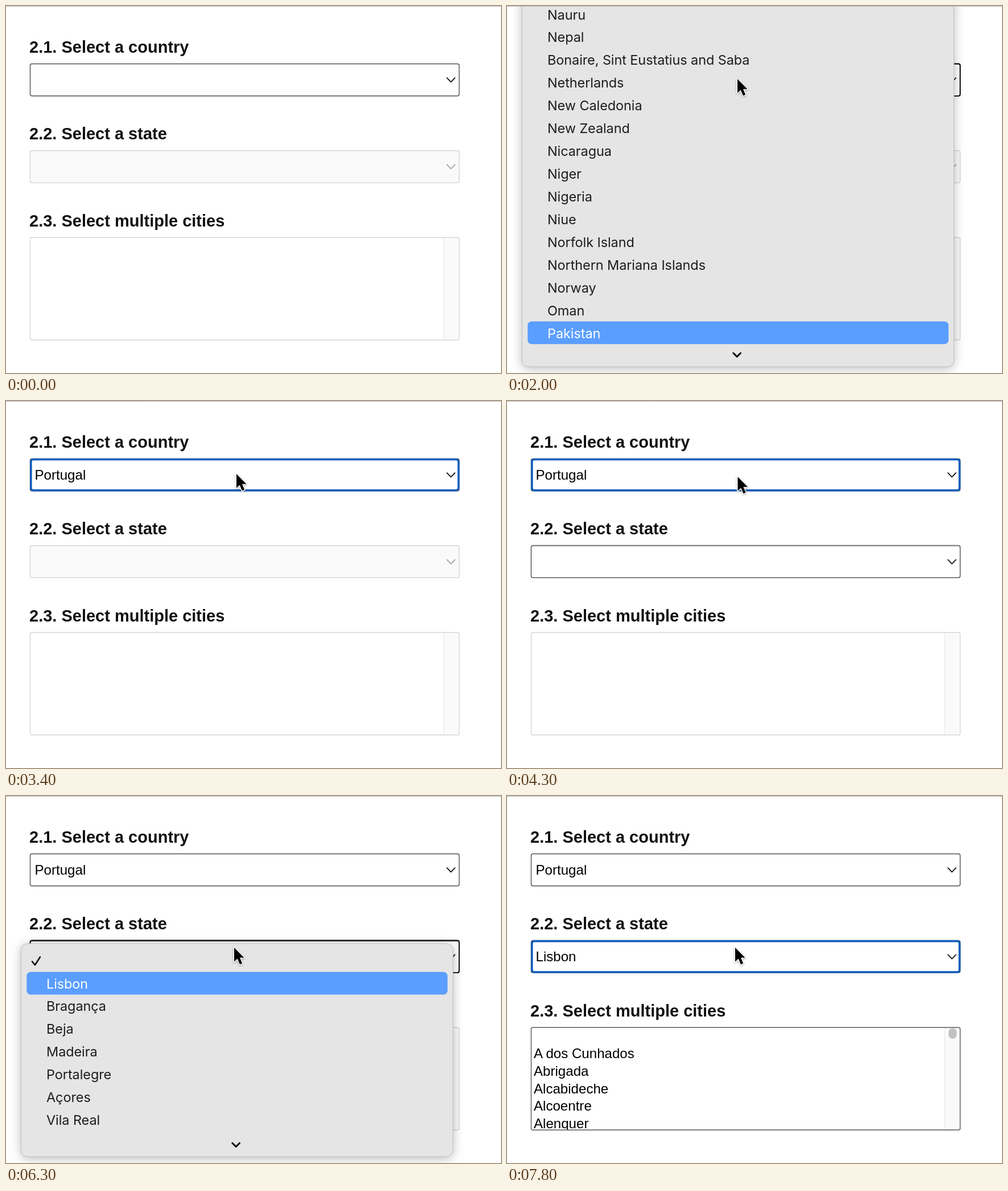
Recreate the animation shown at these times as an HTML page. Size 870 px wide and 644 px high, loop 8000 ms.

```html
<!DOCTYPE html>
<html lang="en">
<head>
<meta charset="utf-8">
<title>Dependent selects</title>
<style>
html, body { margin: 0; width: 100%; height: 100%; overflow: hidden; background: #fff; }
svg { display: block; width: 870px; height: 644px; }
text { font: 24.1px "Liberation Sans", Arial, sans-serif; fill: #000; }
.head text { font-size: 29px; font-weight: bold; fill: #111; }
.menu text { font: 23.5px Inter, Roboto, sans-serif; letter-spacing: -.1px; fill: #1d1d1d; }
.menu .pick text { fill: #fff; }
.pick rect { fill: #5a9eff; }
.panel { fill: #e5e5e5; stroke: #bcbcbc; filter: drop-shadow(0 3px 9px rgba(0,0,0,.26)); }
.box { fill: #fff; stroke: #505050; stroke-width: 1.4; }
.off { fill: #fafafa; stroke: #d4d4d4; }
.pressed { fill: none; stroke: #000; stroke-width: 1.8; }
.ring { fill: none; stroke: #0f5dbd; stroke-width: 3.6; }
.line { fill: none; stroke: #111; stroke-linecap: round; stroke-linejoin: round; }
.dim { stroke: #a6a6a6; }

/* one loop is 8 s, so 1.25% is 100 ms */
.run { animation: 8s step-end -8ms infinite; }
#countryPressed { animation-name: country-pressed; }
#countryRing { animation-name: country-ring; }
#countryValue { animation-name: country-value; }
#stateOn { animation-name: state-on; }
#statePressed { animation-name: state-pressed; }
#stateDone { animation-name: state-done; }
#citiesOn { animation-name: cities-on; }
#menuFirst { animation-name: menu-first; }
#menuCountry { animation-name: menu-country; }
#countryList { animation-name: country-list; }
#countryPick { animation-name: country-pick; }
#pickA { animation-name: pick-a; }
#pickB { animation-name: pick-b; }
#pickC { animation-name: pick-c; }
#menuState { animation-name: menu-state; }
#statePick { animation-name: state-pick; }
#cursor { animation-name: move; }

@keyframes country-pressed { 0%, 42.5% { opacity: 0 } 11.25% { opacity: 1 } }
@keyframes country-ring { 0%, 65% { opacity: 0 } 42.5% { opacity: 1 } }
@keyframes country-value { 0% { opacity: 0 } 42.5%, 100% { opacity: 1 } }
@keyframes state-on { 0% { opacity: 0 } 46.25%, 100% { opacity: 1 } }
@keyframes state-pressed { 0%, 92.5% { opacity: 0 } 62.5% { opacity: 1 } }
@keyframes state-done { 0% { opacity: 0 } 92.5%, 100% { opacity: 1 } }
@keyframes cities-on { 0% { opacity: 0 } 97.5%, 100% { opacity: 1 } }
@keyframes menu-first { 0%, 25% { opacity: 0 } 12.5% { opacity: 1 } }
@keyframes menu-country {
  0%, 42.5% { opacity: 0 } 25% { opacity: 1 }
  38.75% { opacity: .94 } 40% { opacity: .65 } 41.25% { opacity: .25 }
}
@keyframes country-list {
  0% { transform: none }
  26.25% { transform: translateY(-359.37px) }
  27.5%, 100% { transform: translateY(-399.3px) }
}
@keyframes country-pick { 0%, 38.75%, 100% { opacity: 1 } 33.75% { opacity: 0 } }
@keyframes pick-a { 0% { opacity: 1 } 26.25%, 100% { opacity: 0 } }
@keyframes pick-b { 0%, 27.5% { opacity: 0 } 26.25% { opacity: 1 } }
@keyframes pick-c { 0% { opacity: 0 } 27.5%, 100% { opacity: 1 } }
@keyframes menu-state {
  0%, 92.5% { opacity: 0 } 65% { opacity: 1 }
  88.75% { opacity: .92 } 90% { opacity: .6 } 91.25% { opacity: .22 }
}
@keyframes state-pick { 0%, 86.25% { opacity: 0 } 78.75%, 88.75%, 100% { opacity: 1 } }
@keyframes move {
  0% { transform: translate(-60px, 350px) }
  1.25% { transform: translate(27px, 350px) }
  2.5% { transform: translate(62px, 290px) }
  3.75% { transform: translate(126px, 205px) }
  5% { transform: translate(215px, 122px) }
  6.25% { transform: translate(300px, 74px) }
  7.5% { transform: translate(358px, 66px) }
  8.75% { transform: translate(391px, 92px) }
  10% { transform: translate(403px, 118px) }
  11.25% { transform: translate(405px, 128px) }
  53.75% { transform: translate(405.5px, 133px) }
  55% { transform: translate(406px, 146px) }
  56.25% { transform: translate(406px, 168px) }
  57.5% { transform: translate(405px, 195px) }
  58.75% { transform: translate(404px, 222px) }
  60% { transform: translate(402px, 246px) }
  61.25% { transform: translate(401px, 260px) }
  62.5%, 100% { transform: translate(401px, 266px) }
}
</style>
</head>
<body>
<svg viewBox="0 0 870 644">
  <defs>
    <rect id="frame" x="42.5" y="101.5" width="754" height="56.3" rx="3"/>
    <rect id="focus" x="43.8" y="102.5" width="751.6" height="54.2" rx="4"/>
    <path id="arrow" d="M775 126.2l7 7.2 7-7.2" stroke-width="1.8"/>
    <path id="more" d="M397.8 609l6.4 6.4 6.4-6.4" stroke-width="3"/>
    <path id="check" d="M46 290.5l5 6 9-14" stroke-width="2.6"/>
    <clipPath id="listClip"><rect width="870" height="594"/></clipPath>
    <clipPath id="cityClip"><rect x="43" y="407" width="726" height="178.5"/></clipPath>
  </defs>

  <g class="head">
    <text x="41" y="82">2.1. Select a country</text>
    <text x="41" y="234.3">2.2. Select a state</text>
    <text x="41" y="386.7">2.3. Select multiple cities</text>
  </g>

  <use href="#frame" class="box"/>
  <use href="#arrow" class="line"/>
  <use href="#frame" class="pressed run" id="countryPressed"/>
  <use href="#focus" class="ring run" id="countryRing"/>
  <text x="50.5" y="138" class="run" id="countryValue">Portugal</text>

  <g transform="translate(0 152.3)">
    <use href="#frame" class="box off"/>
    <use href="#arrow" class="line dim"/>
    <g class="run" id="stateOn">
      <use href="#frame" class="box"/>
      <use href="#arrow" class="line"/>
    </g>
    <use href="#frame" class="pressed run" id="statePressed"/>
    <g class="run" id="stateDone">
      <use href="#focus" class="ring"/>
      <text x="50.5" y="138">Lisbon</text>
    </g>
  </g>

  <rect x="769" y="407" width="27" height="179" fill="#fafafa"/>
  <path d="M769.5 407V586" stroke="#e6e6e6"/>
  <rect x="42.5" y="406.3" width="754" height="179.7" rx="3" fill="none" stroke="#d6d6d6" stroke-width="1.4"/>
  <g class="run" id="citiesOn">
    <g id="cities" clip-path="url(#cityClip)"></g>
    <rect x="776" y="407.5" width="14.5" height="18.5" rx="7.2" fill="#c1c1c1"/>
    <rect x="42.5" y="406.3" width="754" height="179.7" rx="3" fill="none" stroke="#606060" stroke-width="1.4"/>
  </g>

  <g class="menu run" id="menuFirst">
    <rect class="panel" x="26.5" y="106.5" width="759" height="526.5" rx="11"/>
    <use href="#check" class="line" y="-152"/>
    <g id="firstList"></g>
    <use href="#more" class="line"/>
  </g>

  <g class="menu run" id="menuCountry">
    <rect class="panel" x="26.5" y="-40" width="759" height="673" rx="11"/>
    <g clip-path="url(#listClip)"><g class="run" id="countryList"></g></g>
    <g class="pick run" id="countryPick">
      <rect x="36.3" y="553.5" width="739.7" height="39.8" rx="7"/>
      <text x="71" y="582.5" class="run" id="pickA">Pakistan</text>
      <text x="71" y="582.5" class="run" id="pickB">Poland</text>
      <text x="71" y="582.5" class="run" id="pickC">Portugal</text>
    </g>
    <use href="#more" class="line"/>
  </g>

  <g class="menu run" id="menuState">
    <rect class="panel" x="26.5" y="259" width="759" height="374" rx="11"/>
    <use href="#check" class="line"/>
    <g id="stateList"></g>
    <g class="pick run" id="statePick">
      <rect x="36.3" y="308.8" width="739.7" height="39.8" rx="7"/>
      <text x="71" y="337.5">Lisbon</text>
    </g>
    <use href="#more" class="line"/>
  </g>

  <path d="M0 .5H870" stroke="#b9b9b9"/>
  <g class="run" id="cursor">
    <path d="M0 0V24.8L5.7 19.4 10 29.6 14.2 27.8 10 17.8H17.6Z" fill="#000" stroke="#fff" stroke-width="3"
      stroke-linejoin="round" paint-order="stroke" style="filter: drop-shadow(0 1.5px 1.5px rgba(0,0,0,.35))"/>
  </g>
</svg>
<script>
const PITCH = 39.93;

function addRows(id, names, x, y, pitch = PITCH) {
  const group = document.getElementById(id);
  names.split("|").forEach((name, i) => {
    const row = document.createElementNS("http://www.w3.org/2000/svg", "text");
    row.setAttribute("x", x);
    row.setAttribute("y", y + i * pitch);
    row.textContent = name;
    group.append(row);
  });
}

addRows("firstList", "Afghanistan|Aland Islands|Albania|Algeria|American Samoa|Andorra|Angola|" +
  "Anguilla|Antarctica|Antigua And Barbuda|Argentina", 71, 185.5);
addRows("countryList", "Nauru|Nepal|Bonaire, Sint Eustatius and Saba|Netherlands|New Caledonia|" +
  "New Zealand|Nicaragua|Niger|Nigeria|Niue|Norfolk Island|Northern Mariana Islands|Norway|Oman|" +
  "Pakistan|Palau|Palestinian Territory Occupied|Panama|Papua new Guinea|Paraguay|Peru|" +
  "Philippines|Pitcairn Island|Poland|Portugal", 71, 23.5);
addRows("stateList", "Lisbon|Bragança|Beja|Madeira|Portalegre|Açores|Vila Real", 71, 337.5);
addRows("cities", "A dos Cunhados|Abrigada|Alcabideche|Alcoentre|Alenquer", 47, 460, 30.8);
</script>
</body>
</html>
```
